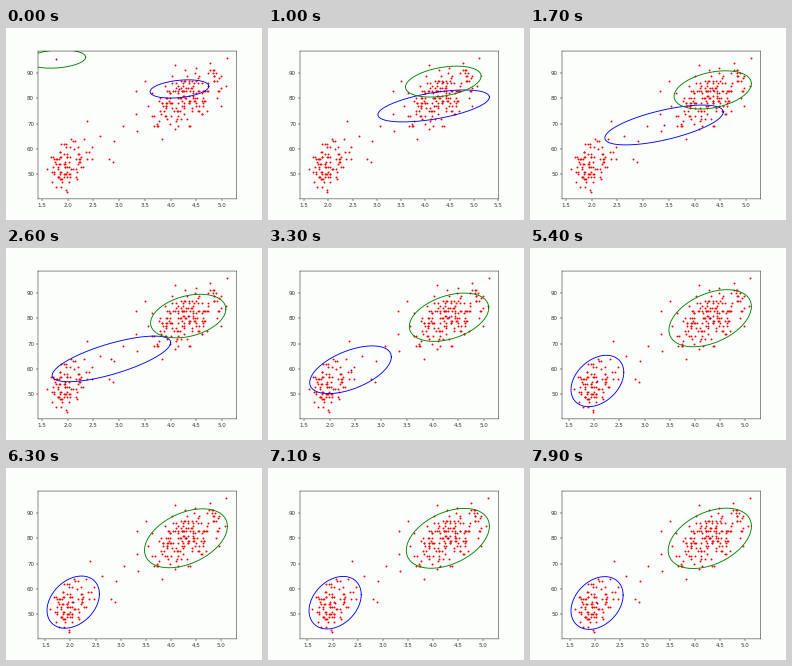
Animation, 256 px wide and 192 px high, one loop 8 s. Source, as a matplotlib script:

```python
import numpy as np
import matplotlib.pyplot as plt
from matplotlib.animation import FuncAnimation

FRAMES, STEP = 80, 100
PAPER = "#fcfefc"
rng = np.random.default_rng(4)

# the lone eruptions between and at the edges of the two clusters
LONE = np.array([
    (1.6, 52), (1.98, 43), (2.38, 71), (2.63, 65), (2.8, 56), (2.88, 55),
    (2.9, 63), (3.07, 69), (3.33, 83), (3.33, 74), (3.35, 67), (3.5, 87),
    (3.83, 64), (4.08, 93), (4.77, 94), (5.1, 96),
])

# poses reached at these frames: centre x, y, half width, height, correlation
KEYS = np.array([0, 10, 26, 42, 79])
BLUE = np.array([
    (4.17, 83.7, 0.57, 3.6, 0.3),
    (4.17, 77.0, 1.15, 6.3, 0.55),
    (2.85, 64.0, 1.15, 9.0, 0.72),
    (2.08, 56.6, 0.53, 9.7, 0.4),
    (2.05, 54.5, 0.52, 10.4, 0.3),
])
GREEN = np.array([
    (1.78, 95.5, 0.57, 3.6, 0.2),
    (4.37, 86.6, 0.78, 6.1, 0.35),
    (4.34, 80.9, 0.73, 8.6, 0.32),
    (4.30, 80.1, 0.80, 10.2, 0.43),
    (4.30, 80.0, 0.83, 11.9, 0.4),
])
THETA = np.linspace(0, 2 * np.pi, 161)


def cluster(n, mean, spread, rho, reach=2.2):
    """Correlated normal cloud cut off at a given number of deviations."""
    a, b = rng.normal(size=(2, 3 * n))
    keep = np.hypot(a, b) < reach
    a, b = a[keep][:n], b[keep][:n]
    x = mean[0] + spread[0] * a
    y = mean[1] + spread[1] * (rho * a + np.sqrt(1 - rho**2) * b)
    return np.column_stack([np.round(x * 60) / 60, np.round(y)])


def settle(i):
    return 1 - np.exp(-i / 14)


def pose(poses, i):
    return [np.interp(settle(i), settle(KEYS), col) for col in poses.T]


def ellipse(cx, cy, hx, hy, rho):
    c, s = np.cos(THETA), np.sin(THETA)
    return cx + hx * c, cy + hy * (rho * c + np.sqrt(1 - rho**2) * s)


def padded(values):
    lo, hi = np.min(values), np.max(values)
    pad = 0.05 * (hi - lo)
    return lo - pad, hi + pad


short = cluster(90, (2.0, 54.3), (0.24, 5.6), 0.28)
# most short eruptions crowd the low end, with a thin tail to the right
short[:, 0] = 1.65 + 0.85 * np.clip((short[:, 0] - 1.47) / 1.06, 0, 1) ** 1.3
long = cluster(166, (4.3, 80), (0.38, 5.8), 0.38)
long[:, 0] = np.minimum(long[:, 0], 5.07)
data = np.vstack([LONE, short, long])

fig, ax = plt.subplots(figsize=(6.4, 4.8), dpi=40, facecolor=PAPER)
ax.set_facecolor(PAPER)
ax.tick_params(labelcolor="0.2")
for spine in ax.spines.values():
    spine.set_snap(False)

ax.scatter(*data.T, s=12, color="red", lw=0, zorder=1)
means = ax.scatter([], [], s=12, color="purple", lw=0, zorder=2)
rings = [(poses, ax.plot([], [], color=color, lw=1.6)[0])
         for poses, color in ((BLUE, "blue"), (GREEN, "green"))]


def update(i):
    xs, ys = [data[:, 0]], [data[:, 1]]
    centres = []
    for poses, line in rings:
        p = pose(poses, i)
        x, y = ellipse(*p)
        line.set_data(x, y)
        centres.append(p[:2])
        if i > 0:  # the opening view fits the points only
            xs.append(x)
            ys.append(y)
    means.set_offsets(centres)
    ax.set_xlim(padded(np.concatenate(xs)))
    ax.set_ylim(padded(np.concatenate(ys)))
    return [means] + [line for _, line in rings]


anim = FuncAnimation(fig, update, frames=FRAMES, interval=STEP,
                     repeat=True, repeat_delay=0, blit=False)
plt.show()
```
